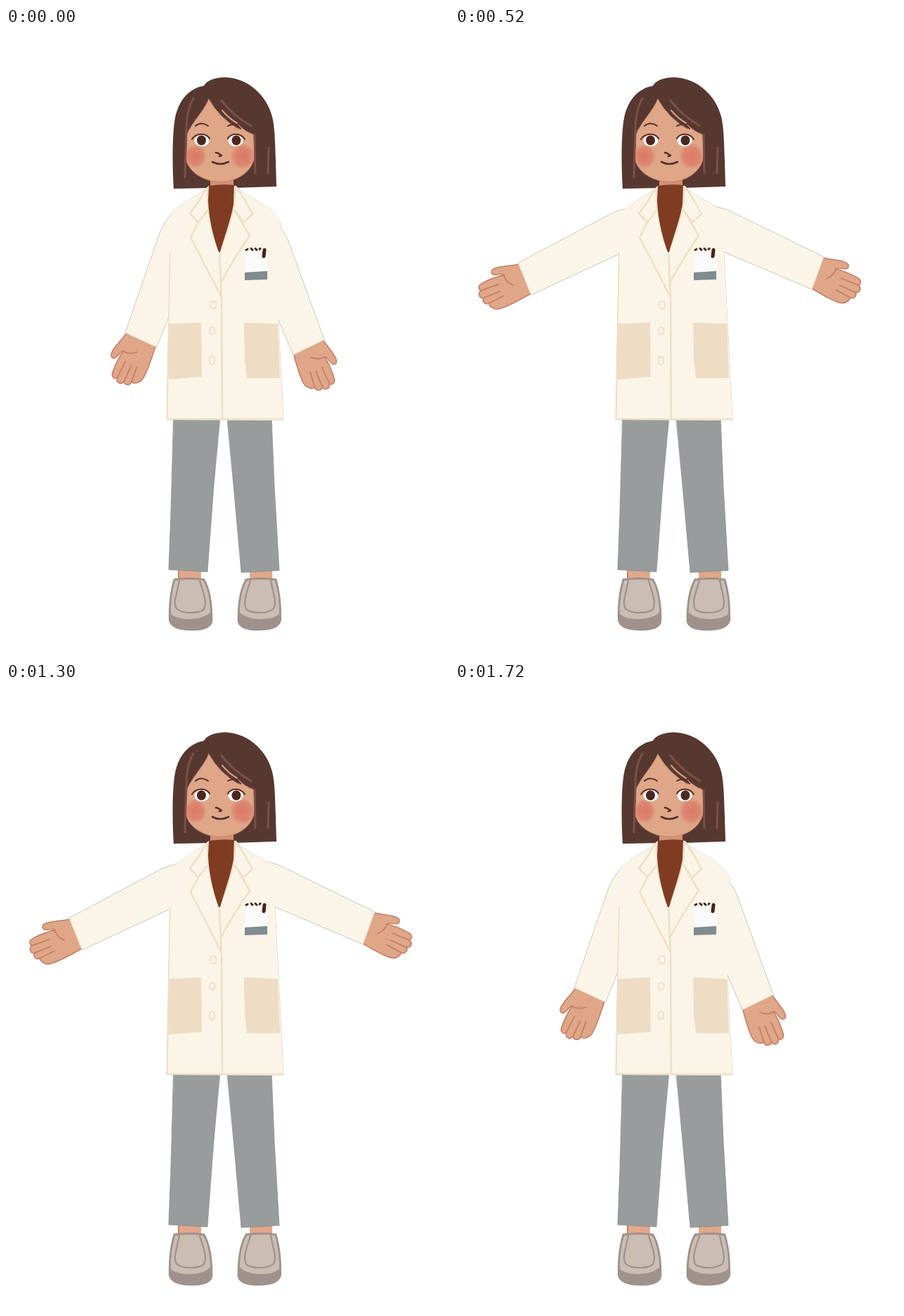
Write an HTML page that moves like this. It is 629x890 px and loops after 1820 ms.

```html
<!DOCTYPE html>
<html lang="en">
<head>
<meta charset="utf-8">
<title>Open arms</title>
<style>
  html, body { margin: 0; height: 100%; overflow: hidden; background: #fff; }
  svg { display: block; width: 100%; height: 100%; }
  path, ellipse { stroke-linecap: round; stroke-linejoin: round; }
  .cloth { fill: #fbf5e7; }
  .skin { fill: #dfa688; }
  .edge { stroke: #8d867d; stroke-opacity: .5; stroke-width: .8; }
  .seam { fill: none; stroke: #f0dfc8; stroke-width: 2.6; }
  .ink { fill: none; stroke: #54302a; stroke-width: 2.6; }
  .pen { fill: none; stroke: #4a2416; stroke-width: 3; }
  .strand { fill: none; stroke: #7c4e46; stroke-width: 3; }
  .crease { fill: none; stroke: #c67f68; stroke-width: 1.8; }
  .grey { fill: #969d9c; stroke: #7d8382; stroke-width: .6; }
</style>
</head>
<body>
<svg viewBox="0 0 629 890">
  <defs>
    <radialGradient id="blush">
      <stop offset="0" stop-color="#d9705f" stop-opacity=".8"/>
      <stop offset=".65" stop-color="#d9705f" stop-opacity=".6"/>
      <stop offset="1" stop-color="#d9705f" stop-opacity="0"/>
    </radialGradient>
    <path id="coat" d="M288 224 L283 229 C268 240 250 249 236 261 L233 303 L231 412 L228 556 L394 557
      L384 360 L381 300 L391 278 C382 260 366 250 350 242 L332 230 L325 224 Z"/>
    <!-- Hand and sleeve point left, origin at the middle of the cuff -->
    <g id="hand">
      <path class="skin" stroke="#c67f68" stroke-width="1.6" d="M5 -22 C-12 -24 -22 -30 -33 -30 C-41 -30 -42 -23 -35 -21
        C-30 -19 -26 -19 -24 -16 C-35 -18 -50 -18 -59 -17 C-66 -16 -66 -9 -62 -8
        C-70 -7 -70 2 -63 3 C-68 5 -66 13 -60 13 C-60 20 -54 26 -46 26 C-30 27 -12 24 5 22 Z"/>
      <path class="crease" d="M-62 -8 L-37 -7 M-63 3 L-39 3 M-60 13 L-37 11 M-25 -16 Q-26 -6 -18 2"/>
    </g>
    <g id="sleeve">
      <path class="cloth edge" d="M0 -24.5 L147 -40 C165 -41.5 182 -37 200 -28 L195 10 L153 16.5 L0 24.5 Z"/>
      <path class="seam" style="stroke-width:1.6" d="M.5 -24 V24"/>
    </g>
    <g id="shoe">
      <path fill="#cabdb1" stroke="#9f918c" stroke-width="2.8" d="M239 783 C234 800 232 820 232.500 838
        C233 852 250 854 264 854 C280 854 292 850 292 840 C292 815 288 795 281 783 Q260 780 239 783 Z"/>
      <path fill="#9f918c" d="M232 828 C236 843 285 843 292 826 L293 840 C292 851 280 855 264 855
        C248 855 232 852 231 839 Z"/>
      <path fill="none" stroke="#9f918c" stroke-width="2.2" d="M246 784 C243 803 236 818 243 825
        C252 832 272 831 280 826 C287 818 280 800 275 785"/>
    </g>
  </defs>

  <!-- Legs -->
  <path fill="#e1a78b" d="M244 766 H277 V786 H244 Z M346 766 H378 V787 H346 Z"/>
  <path class="crease" d="M245 771 V782"/>
  <use href="#shoe"/>
  <use href="#shoe" transform="matrix(-1 0 0 1 622 0)"/>
  <path class="grey" d="M238 552 H304 L295 650 L286 772 L231 769 L234 690 Z M314 552 H377 L381 650 L388 770 L334 773 L324 660 Z"/>

  <!-- Hair and face -->
  <path fill="#563830" d="M238 228 C236 195 236 150 240 128 C245 102 260 86 281 82 C285 74 298 70 311 70
    C346 71 371 98 378 126 C382 142 382 165 383 190 L384 225 L323 227 H291 Z"/>
  <path fill="#d29273" d="M290 208 H323 V226 H290 Z"/>
  <path class="skin" stroke="#c98369" stroke-width="1" d="M288 101 C281 118 264 134 257 151 C254 163 254 174 256 187
    C260 206 283 218 304 218.500 C327 218 347 206 352 186 C354 175 353 163 351 151 Q339 147 330 137 L331 144 Q303 128 288 101 Z"/>
  <ellipse cx="269" cy="182" rx="16" ry="18" fill="url(#blush)"/>
  <ellipse cx="336" cy="182" rx="18" ry="19" fill="url(#blush)"/>
  <path class="strand" d="M266 100 C253 122 257 150 255 175 L254 212 M353 152 L354 206 M373 170 L372 206 M306 103 C316 116 332 130 348 139"/>
  <path fill="none" stroke="#cf9c7c" stroke-width="2.2" d="M307 117 Q316 128 328 135"/>
  <g fill="#fff">
    <ellipse cx="278" cy="160" rx="10.500" ry="8"/>
    <ellipse cx="326" cy="160" rx="10.500" ry="8"/>
  </g>
  <g fill="#4b2821">
    <ellipse cx="277.500" cy="159.500" rx="6.500" ry="7"/>
    <ellipse cx="327" cy="159.500" rx="6.500" ry="7"/>
  </g>
  <path class="ink" style="stroke-width:2" d="M264 158 C269 149 284 148 289 157 M315 157 C320 148 334 149 339 158
    M269 139 C275 134 282 135 287 139 M315 139 C322 135 329 137 333 143"/>
  <path class="ink" d="M298 177 Q301 177 306 181 L303 182 M293 190 Q304 196 316 190"/>

  <!-- Coat -->
  <use href="#coat" class="cloth edge"/>
  <g id="left">
    <use href="#hand"/>
    <use href="#sleeve"/>
  </g>
  <g id="right">
    <use href="#hand" transform="translate(4 0) rotate(-4)"/>
    <use href="#sleeve"/>
  </g>
  <use href="#coat" class="cloth"/>
  <path fill="#eedcc5" d="M230 420 L277 418 L278 495 L231 499 Z M338 418 L386 420 L389 497 L342 497 L339 470 Z"/>
  <path class="seam" d="M286 227 C285 262 294 296 303 318 C310 300 321 270 324 250 L326 225
    M283 229 Q275 246 261 263 L273 276 L286 259 M273 276 L262 297 L306 382
    M327 226 Q336 238 350 264 L337 276 L325 259 M325 259 Q334 274 346 295 C330 318 316 340 305 362
    M303 318 L305 362 L306 382 L307 555"/>
  <path fill="#7f3c22" d="M288 224 Q306 221 324 223 L323 250 C320 270 309 300 304 318 H302 C294 296 288 270 287 245 Z"/>
  <path class="seam" style="stroke-width:1.8" d="M233 318 L231 412 L229 555 H393"/>
  <g class="seam" style="stroke-width:2">
    <ellipse cx="294" cy="393" rx="4.500" ry="5.500"/>
    <ellipse cx="293" cy="430" rx="3.800" ry="5"/>
    <ellipse cx="292.500" cy="472" rx="3.800" ry="6"/>
  </g>
  <path fill="#fafafa" d="M340 315 L371 313 V346 L339 348 Z"/>
  <path fill="#7f8c90" d="M339 347 L371 345 V357 L339 358 Z"/>
  <path class="pen" d="M341 315 L343 314 M348 313 L350 315 M354 313 L356 315 M360 314 L361 313"/>
  <path class="pen" style="stroke-width:5" d="M367 315 L366 324"/>
</svg>
<script>
  // Cuff position and downward angle of each arm, from lowered to spread
  const poses = [
    { left: [191.5, 443, 65], right: [430, 453.5, 64] },
    { left: [146, 415, 46.5], right: [472.5, 414, 45] },
    { left: [98.5, 356.5, 22], right: [515.5, 348, 20] },
    { left: [81, 286.5, 0], right: [535.5, 280, -1.5] }
  ];
  const LOOP = 1820, STEP = 130, RISE = 390, FALL = 1300;
  const arms = { left: document.getElementById('left'), right: document.getElementById('right') };

  function poseAt(t) {
    if (t < RISE) return 0;
    if (t < FALL) return Math.min(3, 1 + Math.floor((t - RISE) / STEP));
    return Math.max(0, 2 - Math.floor((t - FALL) / STEP));
  }

  function draw() {
    const pose = poses[poseAt(performance.now() % LOOP)];
    for (const side in arms) {
      const [x, y, angle] = pose[side];
      const flip = side === 'right' ? 'scale(-1 1)' : '';
      arms[side].setAttribute('transform', `translate(${x} ${y}) ${flip} rotate(${-angle})`);
    }
    requestAnimationFrame(draw);
  }
  draw();
</script>
</body>
</html>
```
